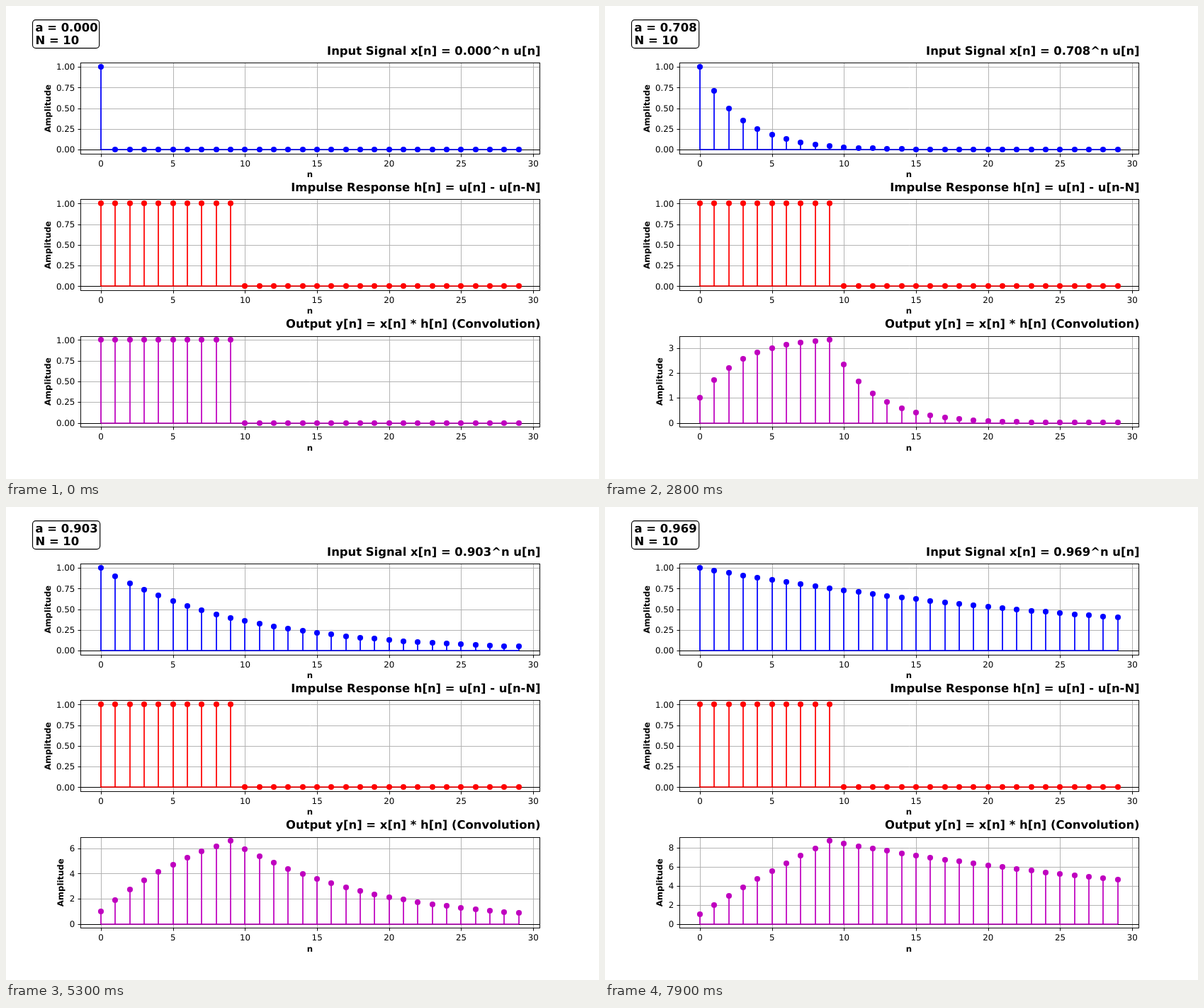
Write an HTML page with a canvas that moves like this. It is 837x669 px and loops after 8 s.

```html
<!DOCTYPE html>
<html lang="en">
<head>
<meta charset="utf-8">
<title>Discrete convolution</title>
<style>
  html, body { margin: 0; width: 100%; height: 100%; overflow: hidden; background: #fff; }
  canvas { display: block; }
</style>
</head>
<body>
<canvas id="stage" width="837" height="669"></canvas>
<script>
const ctx = document.getElementById('stage').getContext('2d');
const STEP_MS = 100, STEPS = 80, DECAY = 0.957;
const COUNT = 30, N = 10;
const LEFT = 104.625, RIGHT = 753.3, HEIGHT = 128.78;
const TOPS = [80.28, 273.45, 466.62];
const FACE = '"DejaVu Sans", sans-serif';
const TICK_FONT = '11.8px ' + FACE;
const LABEL_FONT = 'bold 11.7px ' + FACE;
const TITLE_FONT = 'bold 16.4px ' + FACE;
const THIN = 0.95, THICK = 1.74;

const indices = Array.from({ length: COUNT }, (_, n) => n);
const xAt = n => LEFT + (RIGHT - LEFT) * (n + 1.45) / 31.9;
const crisp = v => Math.round(v) + 0.5;

function line(x1, y1, x2, y2, color, width) {
  ctx.strokeStyle = color;
  ctx.lineWidth = width;
  ctx.beginPath();
  ctx.moveTo(x1, y1);
  ctx.lineTo(x2, y2);
  ctx.stroke();
}

function text(str, x, y, font, align) {
  ctx.font = font;
  ctx.textAlign = align;
  ctx.fillStyle = '#000';
  ctx.fillText(str, x, y);
}

// Smallest "nice" step that leaves at most five intervals.
const tickStep = max => [0.25, 0.5, 1, 2].find(s => s >= max * 0.22);

function plot(top, values, color, title) {
  const max = Math.max(...values);
  const bottom = top + HEIGHT;
  const yAt = v => bottom - HEIGHT * (v / max + 0.05) / 1.1;
  const l = crisp(LEFT), r = crisp(RIGHT), t = crisp(top), b = crisp(bottom);
  const step = tickStep(max);
  const digits = step === 0.25 ? 2 : step === 0.5 ? 1 : 0;

  for (let n = 0; n <= 30; n += 5) {
    const x = crisp(xAt(n));
    line(x, t, x, b, '#b0b0b0', THIN);
    line(x, b, x, b + 4, '#000', THIN);
    text(n, xAt(n), Math.round(bottom + 17.9), TICK_FONT, 'center');
  }
  for (let v = 0; v <= max * 1.05; v += step) {
    const y = crisp(yAt(v));
    line(l, y, r, y, '#b0b0b0', THIN);
    line(l - 4, y, l, y, '#000', THIN);
    text(v.toFixed(digits), 97.3, Math.round(yAt(v) + 4.2), TICK_FONT, 'right');
  }

  const zero = Math.round(yAt(0));
  line(l, zero + 0.5, r, zero + 0.5, '#000', 1.1);
  values.forEach((v, n) => {
    const x = Math.round(xAt(n));
    line(x, zero, x, yAt(v), color, THICK);
  });
  line(xAt(0), zero, xAt(COUNT - 1), zero, color, THICK);
  ctx.fillStyle = color;
  values.forEach((v, n) => {
    ctx.beginPath();
    ctx.arc(Math.round(xAt(n)), Math.round(yAt(v)), 4.05, 0, Math.PI * 2);
    ctx.fill();
  });

  ctx.strokeStyle = '#000';
  ctx.lineWidth = THIN;
  ctx.strokeRect(l, t, r - l, b - t);

  text('n', (LEFT + RIGHT) / 2, Math.round(bottom + 33.1), LABEL_FONT, 'center');
  text(title, 754.6, Math.round(top - 11.2), TITLE_FONT, 'right');
  ctx.save();
  ctx.translate([81, 70.8, 62.8][digits], top + HEIGHT / 2 + 0.3);
  ctx.rotate(-Math.PI / 2);
  text('Amplitude', 0, 0, LABEL_FONT, 'center');
  ctx.restore();
}

function infoBox(a) {
  ctx.strokeStyle = '#000';
  ctx.lineWidth = 1.16;
  ctx.beginPath();
  ctx.roundRect(37.5, 19.7, a === '0.000' ? 94.2 : 95.2, 39.9, 4.5);
  ctx.stroke();
  text('a = ' + a, 41.5, 36, TITLE_FONT, 'left');
  text('N = ' + N, 41.5, 54, TITLE_FONT, 'left');
}

function draw(now) {
  const k = Math.floor(now / STEP_MS) % STEPS;
  const a = 1 - DECAY ** k;
  const label = a.toFixed(3);
  const input = indices.map(n => a ** n);
  const impulse = indices.map(n => (n < N ? 1 : 0));
  const output = indices.map(n =>
    input.slice(Math.max(0, n - N + 1), n + 1).reduce((sum, v) => sum + v, 0));

  ctx.fillStyle = '#fff';
  ctx.fillRect(0, 0, 837, 669);
  ctx.textRendering = 'geometricPrecision';
  plot(TOPS[0], input, '#0000ff', `Input Signal x[n] = ${label}^n u[n]`);
  plot(TOPS[1], impulse, '#ff0000', 'Impulse Response h[n] = u[n] - u[n-N]');
  plot(TOPS[2], output, '#bf00bf', 'Output y[n] = x[n] * h[n] (Convolution)');
  infoBox(label);
}

let start;
function tick(now) {
  start ??= now;
  draw(now - start);
  requestAnimationFrame(tick);
}
draw(0);
requestAnimationFrame(tick);
</script>
</body>
</html>
```
